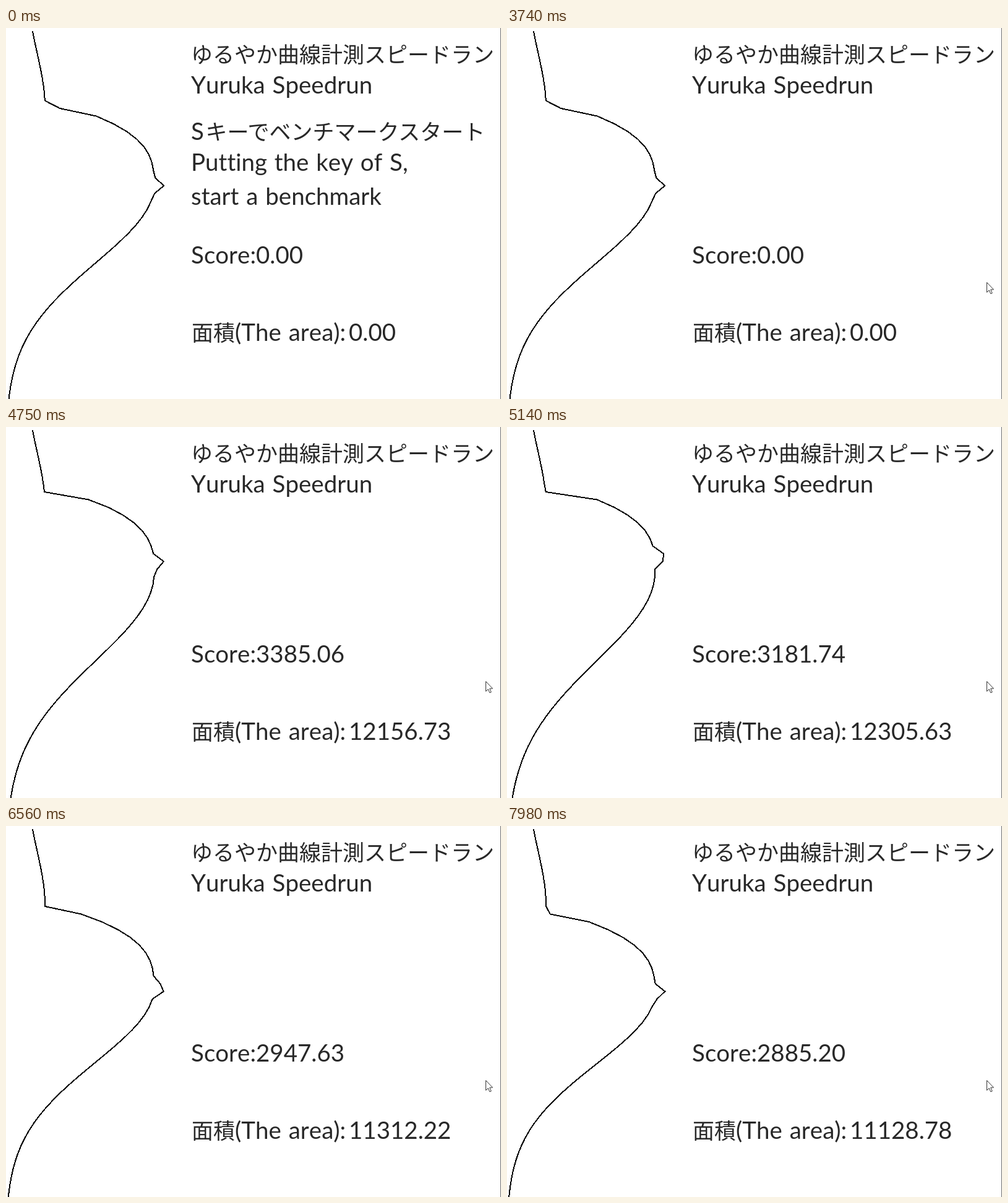
Animation of 800 by 600 pixels, one loop 8000 ms. Source, as an HTML page:

```html
<!DOCTYPE html>
<html lang="ja">
<head>
<meta charset="utf-8">
<title>Curve area speed test</title>
<style>
  html, body { margin: 0; width: 100%; height: 100%; overflow: hidden; background: #fff; }
  svg { display: block; }
  text {
    font: 400 38.5px Lato, "Noto Sans CJK JP", sans-serif; word-spacing: 2px;
    font-kerning: none; font-variant-ligatures: none; fill: #282828;
  }
  .ja { font: 400 35px "Noto Sans CJK JP", "Noto Sans CJK", sans-serif; }
</style>
</head>
<body>
<svg width="800" height="600" viewBox="0 0 800 600">
  <path id="curve" transform="translate(-.8 0)" fill="none" stroke="#000" stroke-width="2" shape-rendering="crispEdges"/>
  <text class="ja" x="299" y="56">ゆるやか曲線計測スピードラン</text>
  <text x="299" y="106">Yuruka Speedrun</text>
  <g id="hint">
    <text x="299" y="181">S<tspan class="ja" x="322.5">キーでベンチマークスタート</tspan></text>
    <text x="299" y="231">Putting the key of S,</text>
    <text x="299" y="286">start a benchmark</text>
  </g>
  <text x="299" y="381">Score:<tspan id="score" x="404"></tspan></text>
  <text x="300" y="506"><tspan class="ja">面積</tspan>(The area):<tspan id="area" x="554"></tspan></text>
  <rect x="799" width="1" height="600" fill="#707070"/>
  <path id="cursor" d="M.5 .5V16.5L4.2 13L6.8 18.8L9.2 17.8L6.7 12H11.5Z" fill="#fff" stroke="#333"/>
</svg>
<script>
const LOOP = 8000;
const HINT_END = 3740;
const $ = id => document.getElementById(id);

// start ms, phase, score, area
const STEPS = [
  [0, 0, "0.00", "0.00"],
  [3940, 0, "4344.97", "94.51"],
  [4230, 0, "4344.97", "11518.60"],
  [4360, 0.5, "3712.41", "11851.92"],
  [4750, 1, "3385.06", "12156.73"],
  [5140, 1.5, "3181.74", "12305.63"],
  [5570, 2, "3104.52", "12219.87"],
  [5860, 2.5, "3051.38", "11946.82"],
  [6220, 3, "2993.17", "11609.84"],
  [6560, 3.5, "2947.63", "11312.22"],
  [7030, 4, "2921.84", "11104.05"],
  [7190, 4.5, "2910.46", "11002.23"],
  [7800, 5, "2893.75", "11010.49"],
  [7980, 5.5, "2885.20", "11128.78"]
];

const { exp, sin, min, floor } = Math;
const sigmoid = v => 1 / (1 + exp(-v));

// Horizontal extent at height y; s = sin(phase) sways the shape
function profile(y, s) {
  const low = 20 * (5 * y + s);
  const top = 100 * (y + 1) + 16 * s;
  return 1.5 * exp((0.12 * s - 0.5) * (y + 0.16 * s) ** 2) * sigmoid(low)
    + (1.5 + 0.8 * (y + 0.2 * s) ** 3) * sigmoid(-low) * sigmoid(top)
    + 0.2 * (exp(-((y + 1) ** 2)) + 1) * sigmoid(-top)
    + 0.1 * exp(-2 * (10 * y + 1.2 * (2 + s) * s) ** 4);
}

function curvePath(phase) {
  const s = sin(phase);
  const points = Array.from({ length: 51 }, (_, i) =>
    `${(160 * profile(i / 10 - 2, s)).toFixed(2)} ${5 + 12.5 * i}`);
  return "M" + points.join("L");
}

function drawCursor(ms) {
  const cursor = $("cursor");
  cursor.style.display = ms < 320 ? "none" : "";
  const p = min(1, floor((ms - 320) / 20.8) / 12);
  const left = (1 - p) ** 1.6;
  cursor.setAttribute("transform", `translate(${775 - 20 * left} ${411 + 184 * left})`);
}

let shown = null;
function showStep(step) {
  if (step === shown) return;
  shown = step;
  const [, phase, score, area] = step;
  $("curve").setAttribute("d", curvePath(phase));
  $("score").textContent = score;
  $("area").textContent = area;
}

function draw(ms) {
  showStep(STEPS.findLast(step => step[0] <= ms));
  $("hint").style.display = ms < HINT_END ? "" : "none";
  drawCursor(ms);
}

const start = performance.now();
function tick() {
  draw((performance.now() - start) % LOOP);
  requestAnimationFrame(tick);
}
tick();
</script>
</body>
</html>
```
